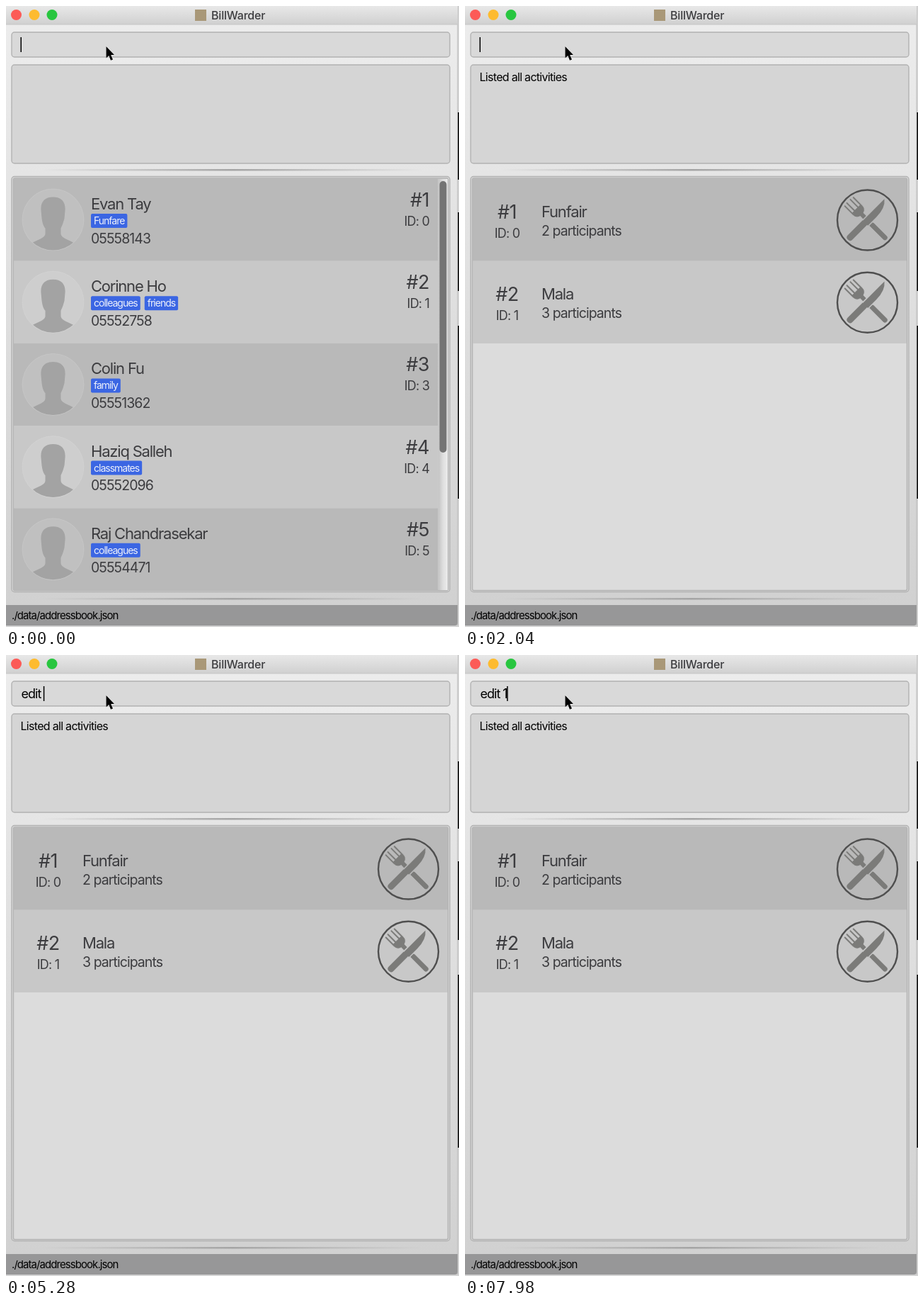
Animation of 640 by 876 pixels, one loop 8 s. Source, as an HTML page:

```html
<!DOCTYPE html>
<html lang="en">
<head>
<meta charset="utf-8">
<title>BillWarder</title>
<style>
html, body { margin: 0; width: 100%; height: 100%; overflow: hidden; background: #d4d4d4; }
svg { display: block; width: 640px; height: 876px; }
text { font-family: Inter, Roboto, sans-serif; fill: #3c3c3f; white-space: pre; }
.title { font-size: 16px; font-weight: 500; letter-spacing: -.2px; }
.cmd { font-size: 18px; letter-spacing: -1px; fill: #000; }
.msg { font-size: 16px; letter-spacing: -.7px; fill: #000; }
.path { font-size: 15px; letter-spacing: -.94px; fill: #000; }
.name { font-size: 22px; letter-spacing: -1.2px; }
.info { font-size: 19.5px; letter-spacing: -.95px; }
.num { font-size: 27px; letter-spacing: -.5px; }
.id { font-size: 18px; letter-spacing: -.8px; }
.tag { font-size: 14px; letter-spacing: -1px; fill: #eef1fb; }
.box { stroke: #b2b2b2; stroke-width: 1.4; }
</style>
</head>
<body>
<svg viewBox="0 0 640 876">
  <defs>
    <linearGradient id="bar" x2="0" y2="1"><stop stop-color="#e8e8e8"/><stop offset="1" stop-color="#d0d0d0"/></linearGradient>
    <linearGradient id="body" x2="0" y2="1"><stop stop-color="#ededed"/><stop offset="1" stop-color="#d0d0d0"/></linearGradient>
    <linearGradient id="track"><stop stop-color="#c2c2c2"/><stop offset=".5" stop-color="#dedede"/><stop offset="1" stop-color="#ececec"/></linearGradient>
    <linearGradient id="rule"><stop stop-color="#a8a8a8" stop-opacity="0"/><stop offset=".5" stop-color="#a4a4a4"/><stop offset="1" stop-color="#a8a8a8" stop-opacity="0"/></linearGradient>
    <clipPath id="disc"><circle r="43"/></clipPath>
    <g id="avatar">
      <circle r="43.5" fill="#fff" fill-opacity=".1" stroke="#fff" stroke-opacity=".12"/>
      <path clip-path="url(#disc)" fill="#a3a3a3" d="M0-32C12-32 18-25 17-13L16-2C14 6 12 10 11 12V20C12 27 26 29 31 34V50H-31V34C-26 29-12 27-11 20V12C-13 10-15 6-16-2L-17-13C-18-25-12-32 0-32Z"/>
    </g>
    <g id="cutlery">
      <circle r="42.5" fill="none" stroke="#4f4f4f" stroke-width="2.4"/>
      <path transform="rotate(-45)" fill="#7b7b79" d="M-10-37Q-8.500-39-7-37V-23H-5V-38Q-3.500-40-2-38V-23H2V-38Q3.500-40 5-38V-23H7V-37Q8.500-39 10-37V-20Q10-13 3.500-11V8H4V35Q4 39 0 39T-4 35V8L-3.500-11Q-10-13-10-20Z"/>
      <path transform="rotate(45)" fill="#7b7b79" stroke-width="3" paint-order="stroke" d="M-4-38Q6-30 6-12V5H4.500V35Q4.500 39 0 39T-4.500 35V5H-4Z"/>
    </g>
  </defs>
  <rect width="640" height="876" fill="#d4d4d4"/>
  <path d="M638 150h2v95h-2zM638 291h2v111h-2zM638 451h2v244h-2z"/>
  <rect width="638" height="874" fill="url(#body)"/>
  <path d="M638 0V874" stroke="#bcbcbc"/>
  <rect width="638" height="26" fill="url(#bar)"/>
  <path d="M0 26H638" stroke="#c4c4c4"/>
  <circle cx="14.500" cy="12.500" r="7.500" fill="#fc5b57"/>
  <circle cx="40" cy="12.500" r="7.500" fill="#fdbb2f"/>
  <circle cx="65" cy="12.500" r="7.500" fill="#28c63f"/>
  <rect x="267" y="5" width="16" height="16" fill="#a99878"/>
  <text class="title" x="290" y="18.500">BillWarder</text>
  <rect class="box" x="8" y="37" width="619" height="35" rx="4" fill="#d9d9d9"/>
  <rect class="box" x="8" y="83" width="619" height="139" rx="4" fill="#d5d5d5"/>
  <path d="M50 230h540v2.500H50zM50 835h540v2.500H50z" fill="url(#rule)"/>
  <rect class="box" x="8" y="240.500" width="619" height="586" rx="4" fill="#d8d8d8"/>
  <rect class="box" x="10.500" y="243" width="614" height="581.500" rx="2" fill="#dcdcdc"/>
  <g id="people"></g>
  <g id="activities"></g>
  <path d="M0 845H638V870Q638 874 634 874H0Z" fill="#979798"/>
  <text class="path" x="8" y="864.500">./data/addressbook.json</text>
  <text class="cmd" id="cmd" x="21.500" y="61"></text>
  <rect id="caret" y="44" width="1.500" height="21"/>
  <path d="M141.500 57V73.500L145.300 70L148 76.700L151 75.400L148.200 69H153Z" stroke="#fff" stroke-width="1" paint-order="stroke"/>
</svg>
<script>
const $ = id => document.getElementById(id);
const people = $('people'), activities = $('activities'), cmd = $('cmd'), caret = $('caret');
const TOP = 243.5, ROW = 116.2;

function add(parent, tag, attrs, content = '') {
  const el = document.createElementNS('http://www.w3.org/2000/svg', tag);
  for (const k in attrs) el.setAttribute(k, attrs[k]);
  el.textContent = content;
  return parent.appendChild(el);
}
const label = (parent, cls, x, y, str, anchor = 'start') =>
  add(parent, 'text', { class: cls, x, y, 'text-anchor': anchor }, str);

function row(parent, i, width) {
  const g = add(parent, 'g', { transform: `translate(0 ${TOP + i * ROW})` });
  const fill = i % 2 ? '#c8c8c8' : '#b9b9b9';
  add(g, 'rect', { x: 11, width, height: ROW, fill });
  return [g, fill];
}

function person([name, tags, phone, id], i) {
  const [g] = row(people, i, 599.5);
  add(g, 'use', { href: '#avatar', x: 66.5, y: 58 });
  label(g, 'name', 120, 43.5, name);
  let x = 120;
  for (const tag of tags) {
    const box = add(g, 'rect', { x, y: 49.5, height: 20, rx: 2, fill: '#3b66e3' });
    const w = label(g, 'tag', x + 4, 64.5, tag).getComputedTextLength() + 8;
    box.setAttribute('width', w);
    x += w + 6;
  }
  label(g, 'info', 120, 91, phone);
  label(g, 'num', 598, 39.5, '#' + (i + 1), 'end');
  label(g, 'id', 598, 66.5, 'ID: ' + id, 'end');
}

function activity([name, count], i) {
  const [g, fill] = row(activities, i, 613);
  label(g, 'num', 59.5, 56.5, '#' + (i + 1), 'middle');
  label(g, 'id', 59.5, 83.5, 'ID: ' + i, 'middle');
  label(g, 'name', 108, 54.5, name);
  label(g, 'info', 108, 80.5, count + ' participants');
  add(g, 'use', { href: '#cutlery', x: 568.5, y: 58.5, stroke: fill });
}

[['Evan Tay', ['Funfare'], '05558143', 0],
 ['Corinne Ho', ['colleagues', 'friends'], '05552758', 1],
 ['Colin Fu', ['family'], '05551362', 3],
 ['Haziq Salleh', ['classmates'], '05552096', 4],
 ['Raj Chandrasekar', ['colleagues'], '05554471', 5]].forEach(person);
add(people, 'rect', { x: 610.5, y: 244, width: 13.5, height: 580, fill: 'url(#track)' });
add(people, 'rect', { x: 612.5, y: 247, width: 10, height: 383, rx: 5, fill: '#747474' });

[['Funfair', 2], ['Mala', 3]].forEach(activity);
label(activities, 'msg', 20.5, 106, 'Listed all activities');

// Each entry: time in ms, command text from then on
const ENTER = 780, LOOP = 8000, BLINK = 500;
const typing = [[0, '']];
const type = (str, times, start = '') =>
  times.forEach((t, i) => typing.push([t, start + str.slice(0, i + 1)]));
type('list a/', [120, 180, 300, 360, 480, 540, 660]);
typing.push([ENTER, '']);
type('edit ', [2280, 2460, 2580, 2700, 2820]);
type('1 a/', [5640, 5820, 6000, 6060], 'edit ');
typing.push([7620, 'edit 1 a'], [7800, 'edit 1 '], [7980, 'edit 1']);

function draw(now) {
  const t = now % LOOP;
  const [since, str] = typing.findLast(k => k[0] <= t);
  cmd.textContent = str;
  caret.setAttribute('x', 20.5 + (str ? cmd.getComputedTextLength() + .5 : 0));
  caret.style.opacity = Math.floor((t - since) / BLINK) % 2 ? 0 : 1;
  people.style.display = t < ENTER ? '' : 'none';
  activities.style.display = t < ENTER ? 'none' : '';
  requestAnimationFrame(() => draw(performance.now() - begin));
}
const begin = performance.now();
draw(0);
</script>
</body>
</html>
```
